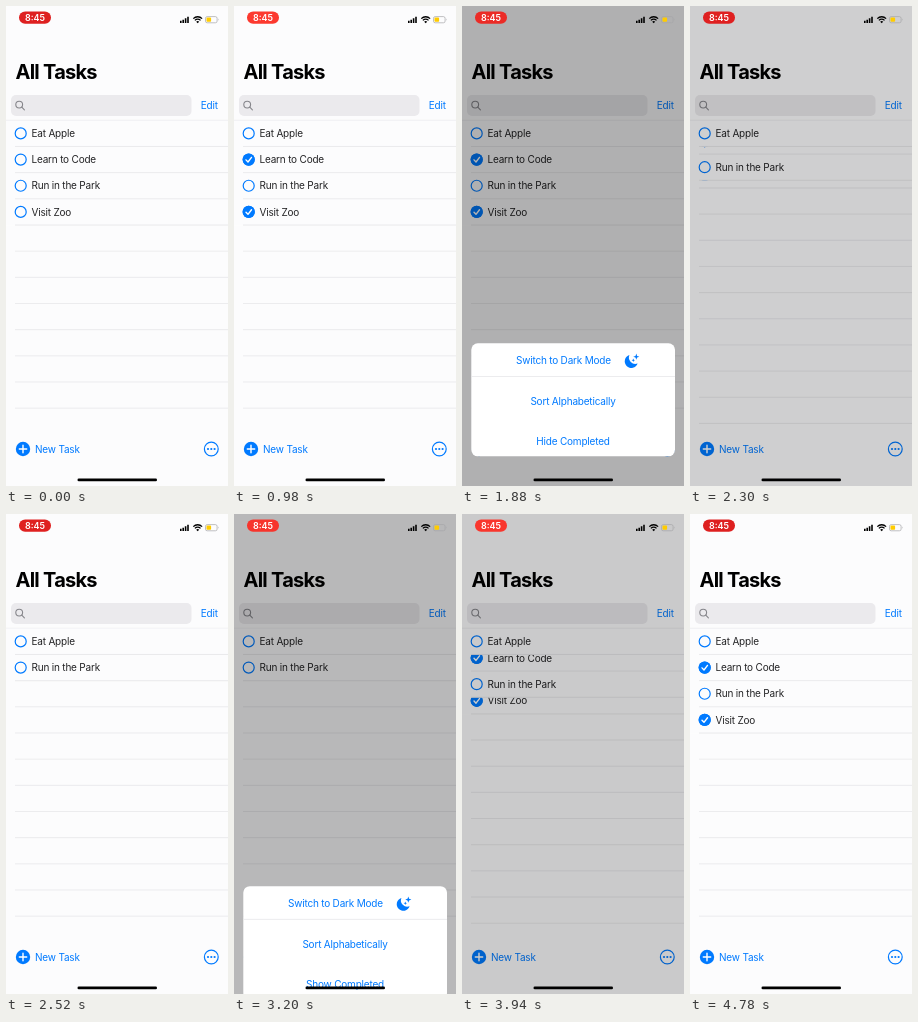
Animation of 222x480 px, one loop 4.8 s. Source, as an HTML page:

```html
<!DOCTYPE html>
<html lang="en">
<head>
<meta charset="utf-8">
<title>All Tasks</title>
<style>
html, body { margin: 0; width: 100%; height: 100%; overflow: hidden; background: #fcfcfd; }
svg { display: block; width: 100vw; height: 100vh; }
text { font: 10px Inter, "Liberation Sans", sans-serif; letter-spacing: -.2px; }
.blue { fill: #007aff; }
.ring { fill: none; stroke: #007aff; stroke-width: 1.2; }
.white { fill: none; stroke: #fff; stroke-width: 1.4; stroke-linecap: round; stroke-linejoin: round; }
.line { stroke: #e4e4e7; stroke-width: .7; }
.mid { text-anchor: middle; }
</style>
</head>
<body>
<svg viewBox="0 0 222 480">
  <defs><clipPath id="table"><rect y="113" width="222" height="312"/></clipPath></defs>
  <rect width="222" height="480" fill="#fcfcfd"/>
  <text x="9.5" y="73.3" style="font-size:20px;font-weight:700;letter-spacing:-.75px">All Tasks</text>
  <rect x="5" y="89" width="180.5" height="21" rx="5" fill="#ebeaed"/>
  <g fill="none" stroke="#86868b" stroke-width="1.1" stroke-linecap="round">
    <circle cx="13.2" cy="98.6" r="3.4"/><path d="M15.8 101.2l2.6 2.6"/>
  </g>
  <text class="blue" x="194.7" y="103">Edit</text>
  <path class="line" d="M0 114.3H222"/>
  <g clip-path="url(#table)"><g id="blank"></g><g id="rows"></g></g>
  <circle class="blue" cx="17" cy="443" r="7.2"/>
  <path class="white" d="M13.3 443h7.4M17 439.3v7.4"/>
  <text class="blue" x="29" y="446.7">New Task</text>
  <circle class="ring" cx="205.3" cy="443" r="6.9"/>
  <g class="blue"><circle cx="202" cy="443" r="1.1"/><circle cx="205.3" cy="443" r="1.1"/><circle cx="208.6" cy="443" r="1.1"/></g>
  <rect id="dim" width="222" height="480"/>
  <g id="sheet">
    <rect x="9.3" y="337.3" width="203.7" height="113" rx="6.5" fill="#fff"/>
    <path class="line" d="M9.3 370.5H213"/>
    <g class="blue">
      <text x="54" y="358.2">Switch to Dark Mode</text>
      <text class="mid" x="111" y="399">Sort Alphabetically</text>
      <text class="mid" x="111" y="439" id="toggle"></text>
      <path d="M167.4 349A6.6 6.6 0 1 0 175.6 357.4A6.4 6.4 0 0 1 167.4 349Z"/>
      <path d="M174.3 347.6l.8 2.3 2.3.8-2.3.8-.8 2.3-.8-2.3-2.3-.8 2.3-.8z"/>
      <path d="M171.3 352.6l.5 1.2 1.2.5-1.2.5-.5 1.2-.5-1.2-1.2-.5 1.2-.5z"/>
    </g>
  </g>
  <rect id="pill" x="13" y="5.5" width="32" height="12.3" rx="6.1"/>
  <text class="mid" x="29" y="15" fill="#fff" style="font-size:9px;font-weight:600;letter-spacing:0">8:45</text>
  <path d="M174 14.8h1.6v2.2H174zM176.4 13.8h1.6V17h-1.6zM178.8 12.3h1.6V17h-1.6zM181.2 10.8h1.6V17h-1.6z"/>
  <g fill="none" stroke="#000" stroke-width="1.3">
    <path d="M187.3 12.6a6.2 6.2 0 0 1 8.8 0M188.9 14.4a3.9 3.9 0 0 1 5.6 0"/>
  </g>
  <path d="M191.7 17.3l-1.5-1.6a2.1 2.1 0 0 1 3 0z"/>
  <rect x="199.5" y="10.6" width="11.6" height="6.2" rx="1.7" fill="none" stroke="#a5a5a8" stroke-width=".7"/>
  <rect x="200.5" y="11.6" width="4.6" height="4.2" rx=".8" fill="#ffcc00"/>
  <path d="M212 12.6q1 1.1 0 2.2z" fill="#a5a5a8"/>
  <rect x="71.5" y="472.6" width="79.5" height="2.6" rx="1.3"/>
</svg>
<script>
const LOOP = 4800, TOP = 114.3, ROW = 26.17;
const OPENS = [1600, 3050], CLOSES = [2145, 3800];
const $ = id => document.getElementById(id);
const ramp = (t, start, span) => {
  const u = Math.min(1, Math.max(0, (t - start) / span));
  return (1 - Math.cos(Math.PI * u)) / 2;
};

// Drawn back to front: completed rows tuck under the row above them.
const tasks = [
  { name: "Visit Zoo", at: v => 1 + 2 * v, done: 860 },
  { name: "Run in the Park", at: v => 1 + v },
  { name: "Learn to Code", at: v => v, done: 460 },
  { name: "Eat Apple", at: () => 0 }
];

$("rows").innerHTML = tasks.map(task => `<g>
  <rect y=".4" width="222" height="${ROW}" fill="#fcfcfd"/>
  <path class="line" d="M9 ${ROW}H222"/>
  <circle class="ring" cx="14.7" cy="13.1" r="5.5"/>
  <g><circle class="blue" cx="14.7" cy="13.1" r="6.1"/><path class="white" d="M12 13.4l2 2.1 3.5-4.6"/></g>
  <text x="25.5" y="16.8" fill="#242426">${task.name}</text></g>`).join("");
tasks.forEach((task, i) => {
  task.node = $("rows").children[i];
  task.mark = task.node.querySelector("g");
});
$("blank").innerHTML = Array.from({ length: 11 }, (_, k) =>
  `<path class="line" d="M9 ${k * ROW}H222"/>`).join("");

const move = (node, y) => node.setAttribute("transform", `translate(0 ${y})`);

function draw(t) {
  const shown = 1 - ramp(t, CLOSES[0] - 35, 300) + ramp(t, CLOSES[1] - 35, 300);
  for (const task of tasks) {
    move(task.node, TOP + ROW * task.at(shown));
    task.mark.style.display = t >= task.done ? "" : "none";
  }
  move($("blank"), TOP + ROW * (2 + 2 * shown));

  let up = 0, shade = 0;
  OPENS.forEach((open, i) => {
    up += ramp(t, open, 225) - ramp(t, CLOSES[i] - 10, 145);
    shade += ramp(t, open, 190) - ramp(t, CLOSES[i], 360);
  });
  move($("sheet"), 143 * (1 - up));
  $("dim").setAttribute("opacity", 0.3 * shade);
  $("toggle").textContent = t < 2700 ? "Hide Completed" : "Show Completed";

  const glow = (1 - Math.cos(t / 2400 * 2 * Math.PI)) / 2;
  $("pill").setAttribute("fill", `rgb(${222 + 33 * glow},${32 + 27 * glow},${32 + 16 * glow})`);
}

const began = performance.now();
function tick() {
  draw((performance.now() - began) % LOOP);
  requestAnimationFrame(tick);
}
draw(0);
requestAnimationFrame(tick);
</script>
</body>
</html>
```
